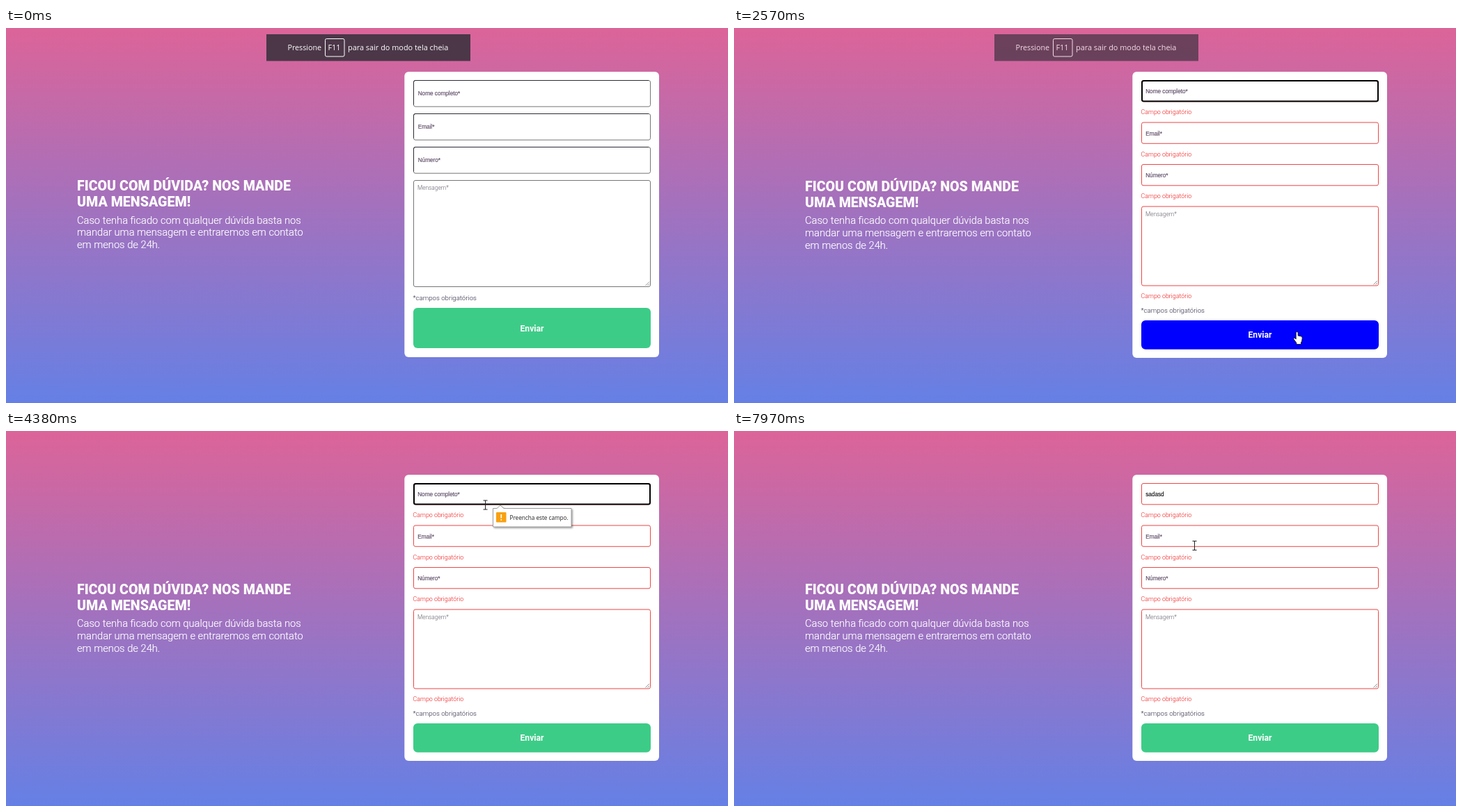
An HTML page for the animation above (8000 ms loop, 1037 by 540 pixels).

```html
<!DOCTYPE html>
<html lang="pt-BR">
<head>
<meta charset="utf-8">
<title>Formulário de contato</title>
<style>
  html, body { margin: 0; width: 100%; height: 100%; overflow: hidden; }
  body { background: linear-gradient(#dc6499, #6580e5); }
  svg { position: absolute; left: 0; top: 0; width: 1037px; height: 540px; }
  text { font-family: Roboto, sans-serif; white-space: pre; }
  .title { font-weight: 900; font-size: 19.64px; fill: #fff; }
  .body { font-weight: 300; font-size: 14.7px; fill: #fff; stroke: #fff; stroke-width: .2px; }
  .hint, .typed { font: 8.2px "Liberation Sans", Arial, sans-serif; stroke-width: .15px; }
  .hint { fill: #5d4a66; stroke: #5d4a66; }
  .typed { fill: #111; stroke: #111; }
  .area { font-weight: 300; font-size: 8.35px; fill: #66606c; }
  .note { font-weight: 300; font-size: 9.65px; fill: #2b2540; }
  .error { font-weight: 300; font-size: 8.9px; fill: #f01818; }
  .send { font-weight: 700; font-size: 12.14px; fill: #fff; text-anchor: middle; }
  .ui { font-family: "Open Sans", "Noto Sans", sans-serif; }
  .box { fill: #fff; stroke: #767676; }
  .invalid { stroke: #f04545; }
</style>
</head>
<body>
<svg viewBox="0 0 1037 540">
  <defs>
    <filter id="shadow" x="-10%" y="-30%" width="120%" height="170%">
      <feDropShadow dx="1.5" dy="1.5" stdDeviation="1.2" flood-opacity=".4"/>
    </filter>
  </defs>
  <g id="copy"></g>
  <rect id="card" x="572.3" y="63" width="365.7" rx="6" fill="#fff"/>
  <g id="blank"></g>
  <g id="errors"></g>
  <rect id="focus" x="586" y="76" width="339" height="29.500" rx="2.500" fill="none" stroke="#000" stroke-width="2"/>
  <text id="nameHint" class="hint" x="591.2" y="94">Nome completo*</text>
  <text id="typed" class="typed" x="591.2" y="94"></text>
  <path id="caret" stroke="#222"/>
  <rect id="button" x="585" width="341" rx="6"/>
  <text id="send" class="send" x="755.5">Enviar</text>

  <g id="banner">
    <rect x="374" y="9" width="293" height="38.500" fill="#4b3748"/>
    <rect x="458.500" y="15.500" width="27.500" height="25.500" rx="2" fill="none" stroke="#fff"/>
    <g fill="#fff" font-size="10.9">
      <text class="ui" x="404.5" y="32" font-size="10.7">Pressione</text>
      <text class="ui" x="462.5" y="32">F11</text>
      <text class="ui" x="491" y="32">para sair do modo tela cheia</text>
    </g>
  </g>

  <g id="bubble">
    <path d="M699.500 111.500H705L710 107L715 111.500H812V138H699.500Z" fill="#fff" stroke="#858585"
      stroke-width=".8" stroke-linejoin="round" filter="url(#shadow)"/>
    <rect x="704" y="117" width="14.500" height="14.500" rx="1" fill="#f8a110"/>
    <path d="M711.300 120V125.500M711.300 127V128.700" stroke="#fff" stroke-width="1.700"/>
    <text class="ui" x="723.5" y="128" font-size="8.2" fill="#222">Preencha este campo.</text>
  </g>

  <g id="suggest">
    <rect x="587" y="108.500" width="337" height="39" rx="2" fill="#3b3b3b" filter="url(#shadow)"/>
    <text class="ui" x="595.5" y="131.500" font-size="8.8" font-weight="600" fill="#fff">sadsdasad</text>
  </g>

  <g id="cursor" stroke-linejoin="round">
    <path id="arrow" d="M.5.5V13L3.300 10.400L5.300 15L7.300 14.100L5.300 9.700H9.200Z" fill="#fff" stroke="#111" stroke-width=".9"/>
    <path id="beam" d="M-3-6.500H3M0-6.500V6.500M-3 6.500H3" fill="none" stroke="#222"/>
    <path id="hand" d="M-1.500 1.500Q0-.8 1.500 1.500V6L6 7Q7.700 7.600 7.600 9.500L7 14L5.800 16V18.500H-.8V16.500L-4.800 11Q-5.300 9-3.500 9.200L-1.500 11Z" fill="#fff" stroke="#111" stroke-width=".9"/>
  </g>
</svg>
<script>
const $ = id => document.getElementById(id);
const LOOP = 8000, ENTER = 1190, SUBMIT = 2440, TYPE = 5830, BLUR = 6460;
const LEFT = 585, WIDTH = 341, FIRST = 75;
const hints = ['Nome completo*', 'Email*', 'Número*'];

const before = {
  pitch: 48, field: 38.7, card: 411,
  area: { top: 219, height: 154 }, button: { top: 403, height: 58 }
};
const after = {
  pitch: 60.5, field: 31.3, card: 412,
  area: { top: 256.5, height: 115 }, button: { top: 421, height: 41.7 }
};

const linear = p => p;
const easeOut = power => p => 1 - (1 - p) ** power;
const ramp = (t, from, to, ease = linear) =>
  ease(Math.min(1, Math.max(0, (t - from) / (to - from))));

const entry = { x: 1021, y: 474 };
const moves = [
  { from: ENTER, to: 2240, x: 813, y: 438, ease: easeOut(1.6) },
  { from: SUBMIT, to: 2980, x: 795, y: 434 },
  { from: 3780, to: 3890, x: 779.5, y: 261.5 },
  { from: 3890, to: 4380, x: 688.5, y: 106.5 },
  { from: 4760, to: 4900, x: 684, y: 115 },
  { from: 5760, to: 6260, x: 519, y: 157.5 },
  { from: 6860, to: 7630, x: 714, y: 392 },
  { from: 7690, to: 7970, x: 661.5, y: 165 }
];

const fieldRect = (layout, i) => ({ top: FIRST + i * layout.pitch, height: layout.field });

const text = (cls, x, y, s) => `<text class="${cls}" x="${x}" y="${y}">${s}</text>`;
const box = (cls, { top, height }) =>
  `<rect class="box ${cls}" x="${LEFT + .5}" y="${top + .5}" width="${WIDTH - 1}" height="${height - 1}" rx="2.5"/>`;
const inset = ({ top, height }) =>
  `<path d="M${LEFT + .5} ${top + height - 3}V${top + 3}q0-2.500 2.500-2.500H923" fill="none" stroke="#2b2a33"/>`;
const message = (cls, area) => {
  const bottom = area.top + area.height - 2;
  return box(cls, area) + text('area', 591, area.top + 14, 'Mensagem*') +
    `<path d="M918.5 ${bottom}l5.500-5.500M921.500 ${bottom}l2.500-2.500" stroke="#777" stroke-width=".8"/>`;
};
const errorText = y => text('error', 584.5, y, 'Campo obrigatório');
const note = y => text('note', 584.5, y, '*campos obrigatórios');

function build() {
  const lines = ['Caso tenha ficado com qualquer dúvida basta nos',
    'mandar uma mensagem e entraremos em contato', 'em menos de 24h.'];
  $('copy').innerHTML =
    text('title', 102, 234.3, 'FICOU COM DÚVIDA? NOS MANDE') +
    text('title', 102, 257.4, 'UMA MENSAGEM!') +
    lines.map((s, i) => text('body', 102, 281.5 + i * 17.75, s)).join('');

  $('blank').innerHTML = hints.map((hint, i) => {
    const rect = fieldRect(before, i);
    return box('', rect) + inset(rect) + text('hint', 591.7, rect.top + 22.3, hint);
  }).join('') + message('', before.area) + note(391.5);

  $('errors').innerHTML = hints.map((hint, i) => {
    const rect = fieldRect(after, i);
    return box('invalid', rect) + errorText(rect.top + 49) +
      (i ? text('hint', 591.2, rect.top + 19, hint) : '');
  }).join('') + message('invalid', after.area) + errorText(389) + note(410);
}

function pointerAt(t) {
  return moves.reduce((pos, { from, to, x, y, ease }) => {
    const p = ramp(t, from, to, ease);
    return { x: pos.x + (x - pos.x) * p, y: pos.y + (y - pos.y) * p };
  }, entry);
}

function pointerKind({ x, y }, layout) {
  const over = ({ top, height }) =>
    x >= LEFT && x <= LEFT + WIDTH && y >= top && y <= top + height + .5;
  if (over(layout.button)) return 'hand';
  const inputs = [...hints.map((_, i) => fieldRect(layout, i)), layout.area];
  return inputs.some(over) ? 'beam' : 'arrow';
}

const show = (id, on) => $(id).style.display = on ? '' : 'none';
const set = (id, attrs) => {
  for (const name in attrs) $(id).setAttribute(name, attrs[name]);
};

function render(t) {
  const sent = t >= SUBMIT, focused = sent && t < BLUR;
  const layout = sent ? after : before;
  show('blank', !sent);
  show('errors', sent);
  show('focus', focused);
  set('copy', { transform: `translate(0 ${sent ? .8 : 0})` });
  set('card', { height: layout.card });

  const { top, height } = layout.button;
  const hover = ramp(t, 1430, 1830, easeOut(2.4)) - ramp(t, 3890, 4300, easeOut(2.4));
  const mix = (a, b) => Math.round(a + (b - a) * hover);
  set('button', { y: top, height, fill: `rgb(${mix(61, 0)},${mix(204, 0)},${mix(136, 255)})` });
  set('send', { y: top + height / 2 + 4.5 });

  const count = Math.min(6, Math.max(0, Math.floor((t - TYPE) / 100) + 1));
  $('typed').textContent = 'sadasd'.slice(0, count);
  show('nameHint', sent && !count);

  const caretX = 592 + (count && $('typed').getComputedTextLength());
  const blinkOn = (t + 160) % 1000 < 500;
  set('caret', { d: `M${caretX} 86V96.5` });
  show('caret', focused && t >= 2800 && (count || blinkOn));

  const grow = ramp(t, 2780, 3020);
  $('banner').style.opacity = 1 - ramp(t, SUBMIT, 3005);
  $('bubble').style.opacity = t < TYPE ? grow : 0;
  set('bubble', { transform: `translate(${71 * (1 - grow)} 0) scale(${.9 + .1 * grow} 1)` });
  $('suggest').style.opacity = ramp(t, 5900, 6040) - ramp(t, 6260, 6520);

  const pos = pointerAt(t), kind = pointerKind(pos, layout);
  show('cursor', t >= ENTER);
  set('cursor', { transform: `translate(${pos.x} ${pos.y})` });
  for (const k of ['arrow', 'beam', 'hand']) show(k, k === kind);
}

function tick() {
  render(performance.now() % LOOP);
  requestAnimationFrame(tick);
}

build();
tick();
</script>
</body>
</html>
```
